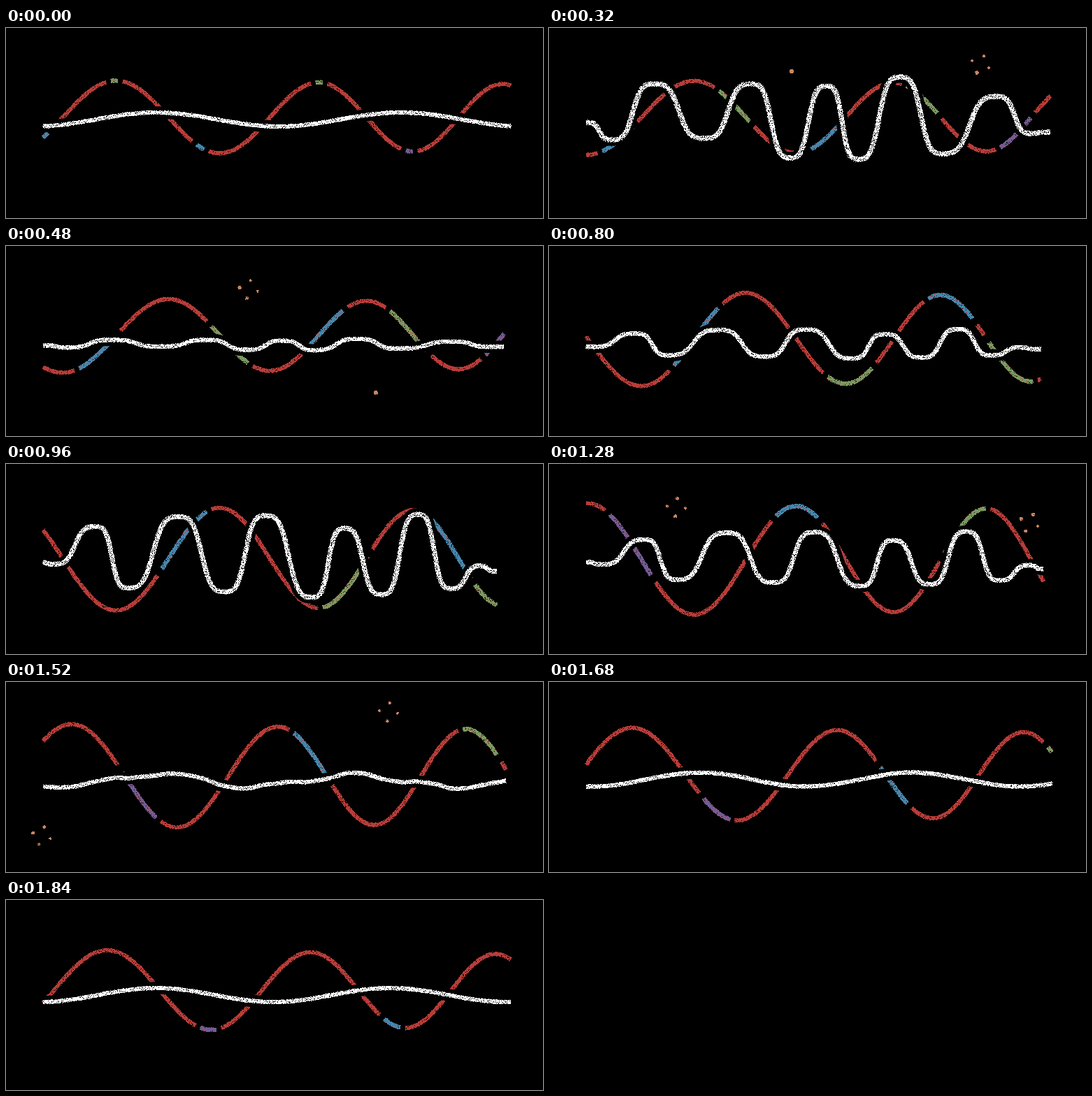
Write an HTML page with a canvas that moves like this. It is 768 px wide and 272 px high and loops after 1.92 s.

```html
<!DOCTYPE html>
<html lang="en">
<head>
<meta charset="utf-8">
<title>Chalk waves</title>
<style>
html, body { margin: 0; width: 100%; height: 100%; overflow: hidden; background: #000; }
canvas { display: block; width: 768px; height: 272px; }
</style>
</head>
<body>
<canvas id="stage" width="768" height="272"></canvas>
<script>
const ctx = document.getElementById('stage').getContext('2d');
const { PI, sin, cos, sqrt, abs, max, min, exp, hypot, round, floor } = Math;
const LOOP = 1920, STEP = 80, LEFT = 53, GAP = 7;
const WHITE = '#fff', RED = '#b83c38', ORANGE = '#c88560';
const GREEN = '#7c9960', BLUE = '#4687ae', PURPLE = '#725c95';

// The white string is plucked twice; each pluck has its own crests and dips.
const plucks = [
  { peak: 320, width: 112, drift: 0, shape: bumps([
    [54, 135], [90, 160], [150, 80], [222, 158], [290, 80], [345, 186], [397, 83],
    [442, 188], [502, 70], [562, 180], [641, 98], [690, 151], [709, 149]]) },
  { peak: 1080, width: 248, drift: .025, shape: bumps([
    [48, 137], [72, 143], [133, 75], [178, 186], [251, 57], [317, 193], [375, 55],
    [442, 203], [488, 78], [541, 198], [593, 53], [640, 187], [683, 146], [702, 156]]) }
];

// Coloured stretches running along the red wave.
const runners = [
  { color: GREEN, start: 155, travel: 660, ease: 1 },
  { color: GREEN, start: 448, travel: 510, ease: 1 },
  { color: BLUE, start: 55, travel: 528, ease: 1.4 },
  { color: BLUE, start: 278, travel: 710, ease: 1 },
  { color: PURPLE, start: 577, travel: 540, ease: 1 },
  { color: PURPLE, start: -279, travel: 593, ease: 1 }
];

// Bursts of four sparks: start time and centre.
const bursts = [
  [160, 617, 52], [320, 347, 62], [480, 529, 210],
  [1120, 182, 62], [1120, 687, 84], [1360, 547, 43], [1360, 51, 220]
];

const lerp = (a, b, u) => a + (b - a) * u;
const clamp = v => max(0, min(1, v));

// Joins points with steep flanks and broad tops.
function bumps(points) {
  const power = 2.6, last = points.length - 1;
  return x => {
    const i = points.findIndex(p => p[0] > x);
    if (i < 1) return points[i ? last : 0][1];
    const [x0, y0] = points[i - 1], [x1, y1] = points[i];
    const u = (x - x0) / (x1 - x0), rise = u ** power;
    return lerp(y0, y1, rise / (rise + (1 - u) ** power));
  };
}

function seeded(seed) {
  return () => {
    seed = seed + 0x6D2B79F5 | 0;
    let n = Math.imul(seed ^ seed >>> 15, 1 | seed);
    n = n + Math.imul(n ^ n >>> 7, 61 | n) ^ n;
    return ((n ^ n >>> 14) >>> 0) / 4294967296;
  };
}

// Swell of the red wave over the later part of the loop.
const swell = t => max(0, sin(PI * (t - 550) / (LOOP - 550)));

// Red wave drifting right by one wavelength per loop, tighter towards the right.
function redWave(t) {
  const grow = swell(t), shift = 2 * t / LOOP;
  return x => {
    const phase = (158 - sqrt(158 ** 2 - 13.2 * (x - 3))) / 6.6;
    const size = (51 + 26 * grow) * (1.06 - .12 * x / 700);
    return 128 + 9 * grow + size * cos(PI * (phase - shift));
  };
}

function whiteString(t) {
  const q = t / LOOP;
  const mid = 131 + 14 * sqrt(sin(PI * q));
  const still = clamp((abs(q - .46) - .2) / .14);
  const length = 350 - 85 * swell(t);
  return x => {
    let y = mid - 10 * still * cos(2 * PI * (x - 215) / length);
    for (const { peak, width, drift, shape } of plucks)
      y = lerp(y, shape(x + drift * (1120 - t)), exp(-(((t - peak) / width) ** 2)));
    return y;
  };
}

function span({ color, start, travel, ease }, q) {
  const mid = start + travel * q ** ease, half = 5 + 27 * sin(PI * q) ** .7;
  return { color, from: mid - half, to: mid + half };
}

function dot(x, y) { ctx.fillRect(round(x - .5), round(y - .5), 1, 1); }

// Grainy line along y = f(x).
function chalk(f, from, to, color, radius, density, rand) {
  const dx = .5;
  let due = 0;
  ctx.fillStyle = color;
  for (let x = from; x < to; x += dx) {
    const y = f(x), dy = f(x + dx) - y, len = hypot(dx, dy);
    for (due += len * density; due >= 1; due--) {
      const s = rand(), off = radius * (2 * rand() - 1);
      dot(x + s * dx - off * dy / len, y + s * dy + off * dx / len);
    }
  }
}

function halo(f, from, to) {
  ctx.beginPath();
  for (let x = from; x <= to; x++) ctx.lineTo(x, f(x));
  ctx.strokeStyle = '#000';
  ctx.lineWidth = 17.5;
  ctx.lineJoin = 'round';
  ctx.stroke();
}

function blob(x, y, size, rand) {
  for (let n = 0; n < size * size * 9; n++) {
    const a = rand() * PI * 2, r = size * sqrt(rand());
    dot(x + r * cos(a), y + r * sin(a));
  }
}

function drawWave(t, right, rand) {
  const wave = redWave(t);
  const spans = runners.map(r => span(r, t / LOOP))
    .filter(s => s.to > LEFT && s.from < right)
    .sort((a, b) => a.from - b.from);
  let x = LEFT;
  for (const { color, from, to } of spans) {
    const a = max(LEFT, from), b = min(right, to);
    chalk(wave, x, from - GAP, RED, 2.8, 13, rand);
    chalk(wave, a, b, RED, 2.9, 4, rand);
    chalk(wave, a, b, color, 3, 12, rand);
    x = to + GAP;
  }
  chalk(wave, x, right, RED, 2.8, 13, rand);
}

function drawString(t, right, rand) {
  const string = whiteString(t);
  const loud = max(...plucks.map(p => exp(-(((t - p.peak) / p.width) ** 2))));
  halo(string, LEFT, right);
  chalk(string, LEFT, right, WHITE, 2.9 + .5 * loud, 10.5, rand);
}

function drawBurst([born, cx, cy], t) {
  const age = (t - born) / STEP, rand = seeded(born + cx);
  if (age < 0 || age > 2) return;
  ctx.fillStyle = ORANGE;
  if (age === 0) return blob(cx, cy, 3, rand);
  const turn = rand() * .6;
  for (let i = 0; i < 4; i++) {
    const a = turn + i * PI / 2, r = 6.5 * age;
    blob(cx + r * cos(a), cy + r * sin(a), 1.5 + rand() * 1.3, rand);
  }
}

function draw(step) {
  const t = step * STEP, rand = seeded(step * 977 + 5);
  const right = 712 + 10 * cos(2 * PI * t / LOOP);
  ctx.fillStyle = '#000';
  ctx.fillRect(0, 0, 768, 272);
  drawWave(t, right, rand);
  drawString(t, right, rand);
  bursts.forEach(b => drawBurst(b, t));
}

let shown = -1;
function tick() {
  const step = floor(performance.now() % LOOP / STEP);
  if (step !== shown) draw(shown = step);
  requestAnimationFrame(tick);
}
tick();
</script>
</body>
</html>
```
